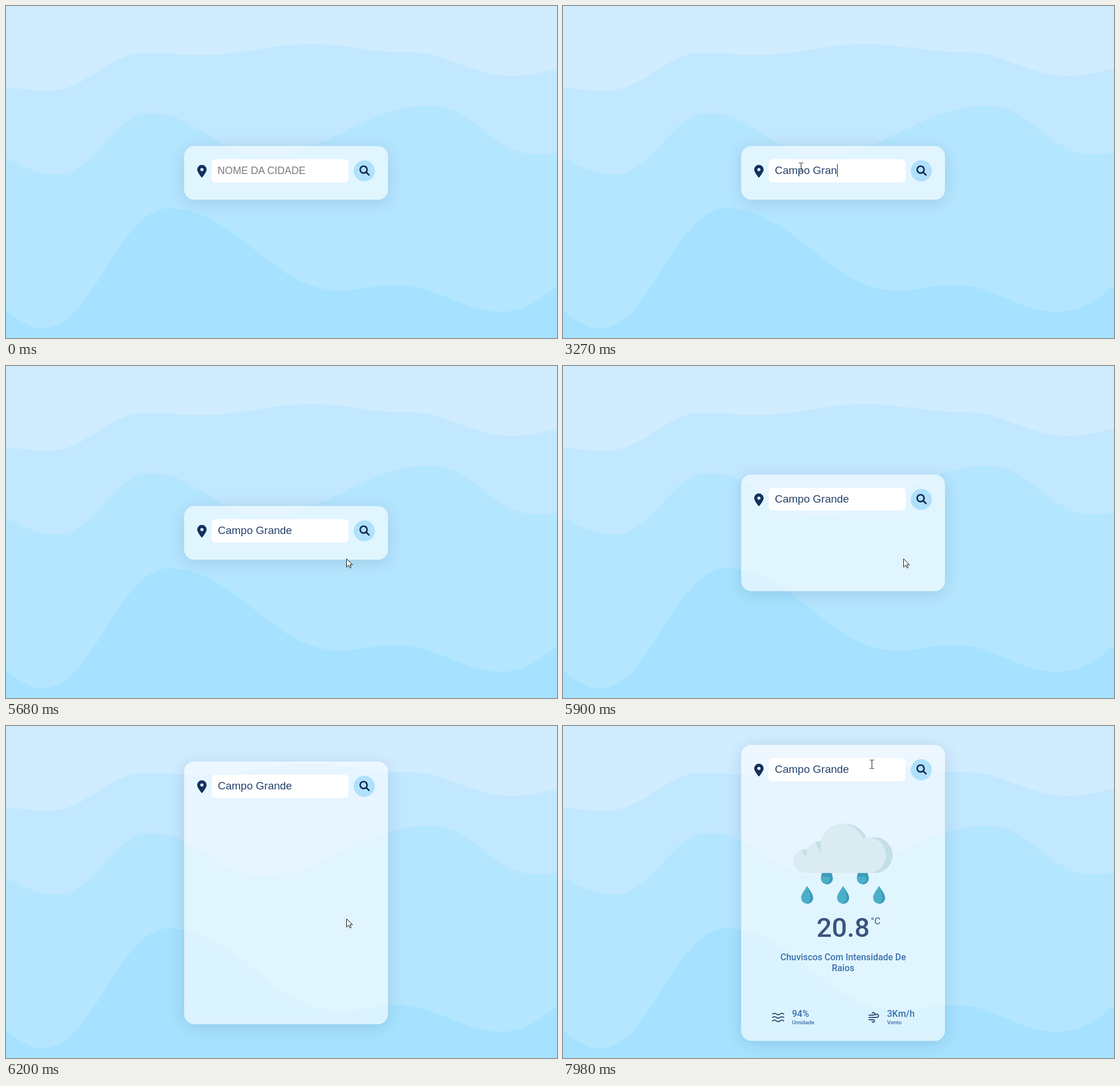
An HTML page that plays this animation: 965 px wide and 581 px high, repeating every 8 s.

```html
<!DOCTYPE html>
<html lang="pt-BR">
<head>
<meta charset="utf-8">
<title>Clima</title>
<style>
  html, body { margin: 0; width: 965px; height: 581px; overflow: hidden; background: #d0ecff; }
  svg { position: absolute; left: 0; top: 0; overflow: visible; }
  #card { position: absolute; left: 312px; width: 357px; border-radius: 18px;
    background: rgba(255,255,255,.6); box-shadow: 0 5px 30px rgba(0,30,60,.13); }
  #field { position: absolute; left: 48px; top: 23px; width: 240px; height: 40.5px; border-radius: 8px; background: #fff;
    font: 19px/40px "Liberation Sans", Arial, sans-serif; white-space: pre; }
  #hint, #entry { position: absolute; left: 11px; top: 0; }
  #hint { color: #7b7b7b; font-size: 17.8px; left: 10.5px; }
  #entry { color: #24406a; }
  #caret { position: absolute; top: 9px; width: 1px; height: 22px; background: #14264a; }
  #weather text { font-family: Roboto, sans-serif; font-weight: 500; fill: #3c70ac; }
  #weather g.block { transform-box: fill-box; transform-origin: center; }
  #weather .dark { fill: #3a547c; }
  .line { fill: none; stroke: #3a547c; stroke-width: 2; stroke-linecap: round; }
  .pointer path { fill: #fff; stroke: #111; stroke-linejoin: round; }
</style>
</head>
<body>
<svg id="waves" width="965" height="581"></svg>

<div id="card">
  <svg width="357" height="94">
    <path fill="#14305f" fill-rule="evenodd" transform="translate(22.8 33) scale(.0432)"
      d="M215.7 499C267 435 384 279 384 192A192 192 0 0 0 0 192C0 279 117 435 168.3 499C180.6 514.5 203.4 514.5 215.7 499ZM192 256a64 64 0 1 1 0-128 64 64 0 1 1 0 128z"/>
    <circle id="button" cx="315.5" cy="43.5" r="18.5"/>
    <g fill="none" stroke="#0f2548" stroke-width="2.6" stroke-linecap="round">
      <circle cx="314.3" cy="41.3" r="6.1"/><path d="M319 46L323.7 50.7"/>
    </g>
  </svg>
  <div id="field"><span id="hint">NOME DA CIDADE</span><span id="entry"><span id="typed"></span><i id="caret"></i></span></div>
</div>

<svg id="weather" width="965" height="581">
  <defs>
    <g id="drop">
      <path fill="#4bafc8" d="M0-15C4-8 10.5-1 10.5 5.5A10.5 10.5 0 0 1-10.5 5.5C-10.5-1-4-8 0-15Z"/>
      <path fill="#3b9bb8" d="M0-15C4-8 10.5-1 10.5 5.5A10.5 10.5 0 0 1-2 16Q6 13 6 6Q6-2 0-15Z"/>
    </g>
    <g id="highDrop"><use href="#drop"/><path fill="#3b9bb8" d="M-8-6H8L10 2.5H-10Z"/></g>
    <path id="ripple" class="line" d="M367 504q3.3-2.6 6.6 0t6.6 0t6.4 0"/>
  </defs>
  <g class="block">
    <use href="#highDrop" x="462" y="261"/><use href="#highDrop" x="525" y="261"/>
    <use href="#drop" x="427.5" y="295"/><use href="#drop" x="490.5" y="295"/><use href="#drop" x="553.5" y="295"/>
    <g fill="#daebf2">
      <circle cx="451" cy="227" r="26"/><circle cx="424" cy="236.5" r="20.5"/>
      <g fill="#c3dee9">
        <path d="M419 216.5Q424 216 428 217Q425 223 425 229Q420 223 419 216.5Z"/>
        <path d="M443 203Q449 201 456 201L452 223Q445 213 443 203Z"/>
        <circle cx="494" cy="211.5" r="40.5"/><circle cx="546" cy="226" r="31.3"/>
      </g>
      <circle cx="489" cy="209.5" r="38.2"/><circle cx="535" cy="226" r="31"/>
      <path d="M424 226H536V257.2H424Z"/>
    </g>
    <text class="dark" x="444" y="369" font-size="47">20.8</text>
    <text class="dark" x="539" y="347" font-size="16.5" style="font-weight:400">°C</text>
    <g text-anchor="middle" font-size="15.8">
      <text x="490.7" y="409.5">Chuviscos Com Intensidade De</text><text x="490.5" y="429">Raios</text>
    </g>
  </g>
  <g class="block">
    <use href="#ripple"/><use href="#ripple" y="6"/><use href="#ripple" y="12"/>
    <path class="line" d="M536 506h7.5a2.3 2.3 0 1 0-2-3.6M536 510h13.5a2.9 2.9 0 1 0-2.4-4.4M536 514h7.5a2.2 2.2 0 1 1-2 3.4"/>
    <text x="401" y="508.5" font-size="16">94%</text><text x="401" y="522" font-size="9.8">Umidade</text>
    <text x="567.5" y="508.5" font-size="16">3Km/h</text><text x="567.5" y="522" font-size="9.8">Vento</text>
  </g>
</svg>

<svg class="pointer" width="965" height="581">
  <g id="arrow"><path d="M.5.5V15l3.6-3.4 2.3 5 2.1-1-2.2-4.8h4.6Z"/></g>
  <g id="beam"><path style="fill:none" d="M-3.5-7.5h2.5l1 1 1-1h2.5M0-6.5V6.5M-3.5 7.5h2.5l1-1 1 1h2.5"/></g>
  <g id="hand"><path d="M-1.6 12V2a1.7 1.7 0 0 1 3.4 0V9V7.6q1.5-1.2 2.9.6V10 8.8q1.5-1.2 2.7.6V11 10q2-.6 2.4 1.2V15q0 3-1.8 5v1.8H.7V20L-4.5 13.5q-.8-2 1-2.2Z"/></g>
</svg>

<script>
const LOOP = 8000, TICK = 76;
const $ = id => document.getElementById(id);
const clamp = v => Math.min(1, Math.max(0, v));

// Each wave swings smoothly between its crests and troughs
function wave(fill, [[x, y], ...turns]) {
  let d = `M${x} ${y}`;
  for (const [nx, ny] of turns) {
    const reach = .4 * (nx - x);
    d += `C${x + reach} ${y} ${nx - reach} ${ny} ${nx} ${ny}`;
    x = nx; y = ny;
  }
  return `<path fill="${fill}" d="${d}V581H-99Z"/>`;
}
$('waves').innerHTML =
  wave('#c2e8ff', [[-60, 137], [75, 148], [245, 82], [340, 86], [531, 67], [705, 81], [884, 122], [1050, 95]]) +
  wave('#b4e6ff', [[-80, 240], [90, 295], [255, 187], [447, 262], [745, 174], [925, 259], [1100, 240]]) +
  wave('#a6e2ff', [[-60, 505], [65, 564], [285, 354], [585, 498], [684, 488], [868, 535], [1085, 425]]);

// Pointer moves: start, end, where to
const MOVES = [
  [210, 680, 420, 273],
  [840, 1230, 417, 282],
  [4270, 4580, 560, 304],
  [4660, 4900, 623, 287],
  [5270, 5680, 596, 337],
  [6980, 7210, 609, 350],
  [7450, 7600, 614, 230],
  [7680, 7830, 556, 59],
  [7900, 7980, 541, 67],
];
function pointerAt(t) {
  let x = 847, y = 583;
  for (const [from, to, endX, endY] of MOVES) {
    if (t < from) break;
    const steps = Math.round((to - from) / TICK) + 1;
    const p = clamp((Math.floor((t - from) / TICK) + 1) / steps);
    x += (endX - x) * p;
    y += (endY - y) * p;
  }
  return [x, y];
}

// Typing bursts: start, pause between keys, text
const BURSTS = [[1780, 137, 'Campo'], [2660, 150, ' Gran'], [3650, 70, 'de']];
const KEYS = BURSTS.flatMap(([from, pause, text]) => [...text].map((key, i) => ({ at: from + i * pause, key })));
const FOCUS = 1050, BLUR = 5030, BLINK = 530;

function drawField(t) {
  const pressed = KEYS.filter(k => t >= k.at);
  const lastInput = pressed.length ? pressed.at(-1).at : FOCUS;
  const caretOn = t >= FOCUS && t < BLUR && (t - lastInput) % (2 * BLINK) < BLINK;
  $('typed').textContent = pressed.map(k => k.key).join('');
  $('hint').style.display = pressed.length ? 'none' : '';
  $('caret').style.display = caretOn ? '' : 'none';
}

function drawCard(t) {
  const s = 5820 + Math.floor((t - 5820) / TICK) * TICK;
  const grow = Math.sin(clamp((s - 5793) / 616) * Math.PI / 2);
  const height = 94 + 424 * grow, top = 292 - height / 2;
  $('card').style.top = top + 'px';
  $('card').style.height = height + 'px';

  const shown = 1 - (1 - clamp((s - 6310) / 270)) ** 2;
  for (const block of document.querySelectorAll('.block')) {
    block.style.opacity = shown;
    block.style.transform = `scale(${shown})`;
  }
  return top;
}

function drawPointer(t, top) {
  const [x, y] = pointerAt(t);
  const overButton = Math.hypot(x - 627.5, y - top - 43.5) < 18.5;
  const overField = x > 360 && x < 600 && y > top + 23 && y < top + 63;
  const shape = overButton ? 'hand' : overField ? 'beam' : 'arrow';
  for (const id of ['arrow', 'beam', 'hand']) {
    $(id).style.display = t >= MOVES[0][0] && id === shape ? '' : 'none';
    $(id).setAttribute('transform', `translate(${x} ${y})`);
  }
  $('button').setAttribute('fill', overButton ? '#8fd5fd' : '#afe0fc');
}

const start = performance.now();
function frame() {
  const t = (performance.now() - start) % LOOP;
  drawField(t);
  drawPointer(t, drawCard(t));
  requestAnimationFrame(frame);
}
frame();
</script>
</body>
</html>
```
